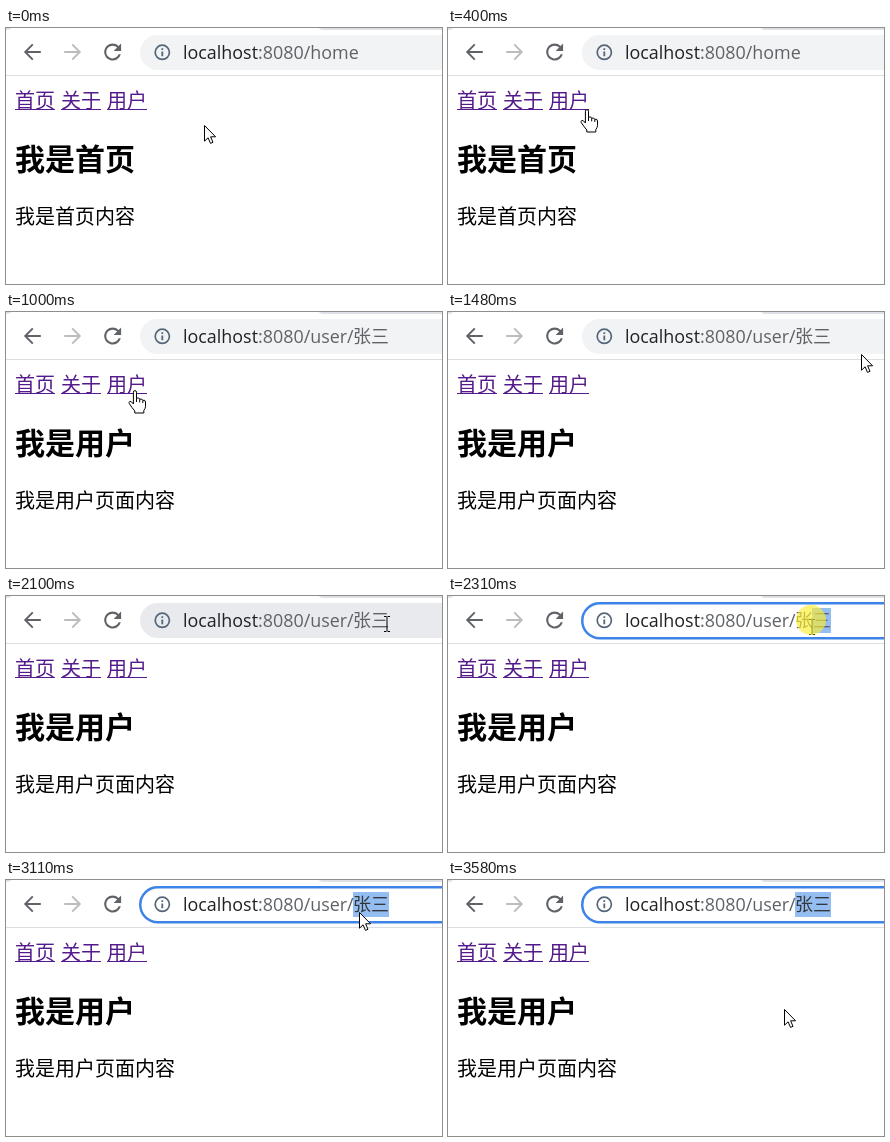
Recreate the animation shown at these times as an HTML page. Size 436 by 256 pixels, loop 3.85 s.

```html
<!DOCTYPE html>
<html lang="zh-CN">
<head>
<meta charset="utf-8">
<title>路由演示</title>
<style>
  html, body { margin: 0; width: 100%; height: 100%; overflow: hidden; background: #fff; }
  svg { display: block; }
  text { font: 350 20px "Noto Sans CJK SC", "Noto Sans CJK", sans-serif; white-space: pre; }
  .url { font: 400 17.9px "Open Sans", sans-serif; fill: #5f6368; }
  .host { fill: #202124; }
  .who { font-size: 18px; fill: #5f6368; }
  .who.picked { fill: #33373b; }
  .link { fill: #551a8b; }
  .title { font-size: 30px; font-weight: 700; }
  .nav { fill: none; stroke: #5f6368; stroke-width: 1.9; }
  .info { fill: #55667a; }
  .cursor { fill: #fff; stroke: #000; stroke-linejoin: round; }
</style>
</head>
<body>
<svg width="436" height="256" viewBox="0 0 436 256">
  <!-- toolbar -->
  <path d="M0 0H5Q4 2 0 2ZM313 0H436V2H318Q314 2 313 0Z" fill="#dee1e6"/>
  <rect y="47" width="436" height="1" fill="#dcdee1"/>
  <path class="nav" d="M34.8 24H19.5M26.8 16.3L19.2 24L26.8 31.7"/>
  <path class="nav" style="stroke:#babcbe" d="M58.2 24H73.5M66.2 16.3L73.8 24L66.2 31.7"/>
  <path fill="#5f6368" transform="translate(93.9 11.3) scale(1.06)" d="M17.65 6.35A7.96 7.96 0 0 0 12 4a8 8 0 1 0 7.73 10h-2.08A6 6 0 1 1 12 6c1.66 0 3.14.69 4.22 1.78L13 11h7V4z"/>
  <rect id="pill" x="134" y="7" width="330" height="35" rx="17.5"/>
  <rect id="ring" x="134.25" y="7.25" width="330" height="35" rx="17.5" fill="#fff" stroke="#3d84e8" stroke-width="2.5"/>
  <circle cx="156.3" cy="24.3" r="7.1" fill="none" stroke="#55667a" stroke-width="1.7"/>
  <path class="info" d="M155.4 23.4h1.8v4.8h-1.8zM155.4 20.2h1.8v1.8h-1.8z"/>
  <rect id="sel" y="12" height="25" fill="#94bdf2"/>
  <text class="url" x="177" y="31"><tspan class="host">localhost</tspan>:8080/<tspan id="path">home</tspan></text>
  <text class="who" id="who" x="347" y="31">张三</text>

  <!-- page -->
  <g class="link">
    <text x="9" y="80">首页</text>
    <text x="55" y="80">关于</text>
    <text x="101" y="80">用户</text>
    <path d="M9 81h40v1H9zM55 81h40v1H55zM101 81h40v1H101z"/>
  </g>
  <text class="title" id="title" x="9" y="142.4"></text>
  <text id="body" x="9" y="196"></text>

  <!-- pointer, drawn with its hot spot at 0,0 -->
  <g id="pointer">
    <path id="arrow" class="cursor" d="M.5 .5V16.2L4.1 12.8L6.5 18.4L9 17.3L6.6 11.8H11.6Z"/>
    <path id="hand" class="cursor" d="M-.6 14V2.2Q-.6 .6 .9 .6Q2.5 .6 2.5 2.2V8.2Q5.3 7.2 5.7 9.2Q8.2 8.4 8.8 10.3Q11.5 9.6 11.5 12V16.5Q11.5 18.5 9.8 20.5V23H.8V21Q-1.8 18 -4.6 13.8Q-5.6 12 -4.2 11.4Q-2.8 10.9 -.6 14ZM2.5 8.2V12M5.7 9.2V12.4M8.8 10.3V13"/>
    <path id="beam" d="M-2 -.5H.2L1 .3L1.8 -.5H4M1 .3V13.7M-2 14.5H.2L1 13.7L1.8 14.5H4" fill="none" stroke="#000"/>
    <circle id="halo" r="15" fill="#fbee2c" fill-opacity=".65"/>
  </g>
</svg>
<script>
  const LOOP = 3850;
  const $ = id => document.getElementById(id);
  const show = (id, on) => $(id).style.display = on ? "" : "none";

  // start ms, last step ms, steps, target x, target y
  const moves = [
    [70, 540, 8, 128, 78],
    [1280, 1480, 4, 413, 42],
    [1550, 1760, 4, 398, 17],
    [1820, 2100, 5, 380, 21],
    [2170, 2310, 3, 363, 24],
    [2440, 2650, 4, 353, 32],
    [3310, 3580, 5, 336, 129]
  ];

  function pointerAt(t) {
    let x = 198, y = 97;
    for (const [from, to, steps, tx, ty] of moves) {
      if (t < from) break;
      const k = Math.min(steps, 1 + Math.floor((t - from) / (to - from) * (steps - 1) + 0.05));
      const p = k / steps, e = p * (2 - p);
      x += (tx - x) * e;
      y += (ty - y) * e;
    }
    return [Math.round(x), Math.round(y)];
  }

  function draw(t) {
    const [x, y] = pointerAt(t);
    const user = t >= 1000, hover = t >= 1820, focus = t >= 2170;
    const name = user ? "用户" : "首页";

    $("path").textContent = user ? "user/" : "home";
    $("title").textContent = "我是" + name;
    $("body").textContent = "我是" + name + (user ? "页面内容" : "内容");
    $("pill").setAttribute("fill", hover ? "#e8eaed" : "#f1f3f4");
    show("who", user);
    show("pill", !focus);
    show("ring", focus);

    const left = !focus || x > 374 ? 383 : x > 356 ? 364 : 347;
    $("sel").setAttribute("x", left);
    $("sel").setAttribute("width", 383 - left);
    $("who").classList.toggle("picked", left === 347);

    const hand = x < 142 && y > 61 && y < 85;
    const beam = y < 42 && t < 3110;
    $("pointer").setAttribute("transform", `translate(${x} ${y})`);
    show("hand", hand);
    show("beam", beam);
    show("arrow", !hand && !beam);
    show("halo", (t >= 870 && t < 940) || (focus && t < 3110));
  }

  const start = performance.now();
  function tick() {
    draw((performance.now() - start) % LOOP);
    requestAnimationFrame(tick);
  }
  tick();
</script>
</body>
</html>
```
